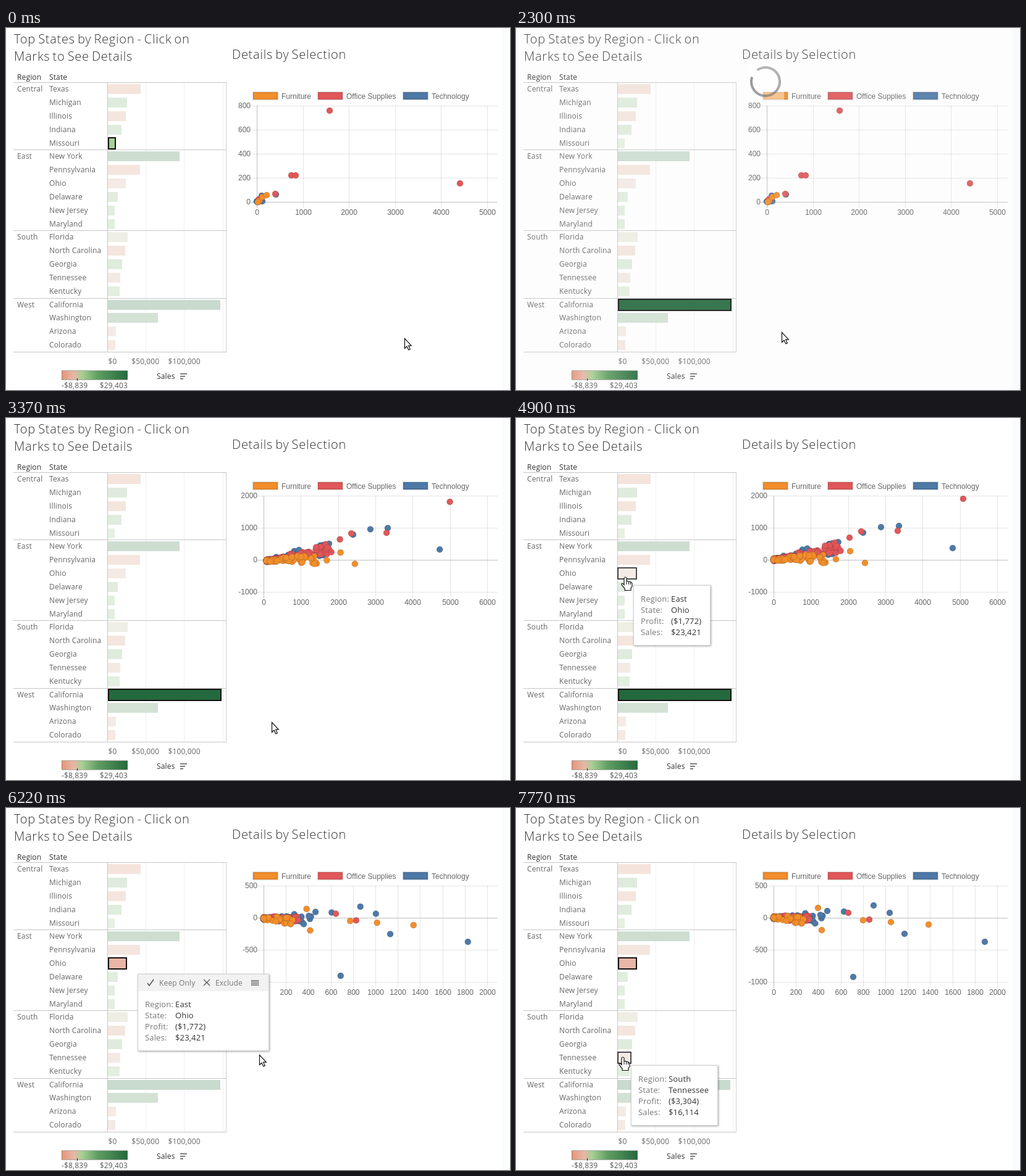
These frames come from a looping animation (816x587 px, 8000 ms). An HTML page with a canvas:

```html
<!DOCTYPE html>
<html lang="en">
<head>
<meta charset="utf-8">
<title>Top States by Region</title>
<style>
html, body { margin: 0; width: 100%; height: 100%; overflow: hidden; background: #fafbfb; }
canvas { display: block; }
</style>
</head>
<body>
<canvas id="stage" width="816" height="587"></canvas>
<script>
const ctx = document.getElementById('stage').getContext('2d');
const SANS = '"Open Sans", "Noto Sans", sans-serif';
const ARIAL = '"Liberation Sans", Arial, sans-serif';
const ORANGE = '#f28e2b', RED = '#e15759', BLUE = '#4e79a7';
const LOOP = 8000, BEAT = 259; // the picture refreshes once per beat

// state: sales, profit
const regions = {
  Central: { Texas: [42800, -8839], Michigan: [25200, 7000], Illinois: [23600, -7000], Indiana: [18000, 6500], Missouri: [9200, 3000] },
  East: { 'New York': [93200, 24000], Pennsylvania: [42000, -7000], Ohio: [23421, -1772], Delaware: [13200, 6000],
    'New Jersey': [9200, 5500], Maryland: [9200, 5500] },
  South: { Florida: [26000, 500], 'North Carolina': [22800, -7000], Georgia: [18800, 7000], Tennessee: [16114, -3304], Kentucky: [15535, 4752] },
  West: { California: [146388, 29403], Washington: [65200, 17000], Arizona: [10800, -1500], Colorado: [10000, -4000] }
};
const rows = Object.entries(regions).flatMap(([region, states]) =>
  Object.entries(states).map(([name, [sales, profit]], i) =>
    ({ region, name, sales, profit, first: i === 0, right: Math.round(164.5 + sales / 800) })));
rows.forEach((row, i) => { row.y = 99.2 + 21.84 * i; });
const find = name => rows.find(row => row.name === name);

// profit colour scale
const MIN = -8839, MAX = 29403;
const scale = [[MIN, [228, 150, 120]], [-1772, [232, 182, 166]], [3000, [166, 208, 148]], [12000, [96, 158, 98]], [MAX, [36, 105, 61]]];
const mix = (a, b, u) => a.map((v, i) => v + (b[i] - v) * u);
const rgb = c => `rgb(${c.map(Math.round)})`;

function profitColor(profit) {
  const i = Math.max(1, scale.findIndex(([limit]) => profit <= limit));
  const [[p0, c0], [p1, c1]] = [scale[i - 1], scale[i]];
  return mix(c0, c1, (profit - p0) / (p1 - p0));
}
const fadedColor = profit => mix([248, 250, 248], profitColor(profit), .22);

let seed = 7;
const rnd = () => (seed = seed * 16807 % 2147483647) / 2147483647;

// points that spread from the origin, each with a margin between low and high
function fan(count, reach, low, high) {
  return ([x, y]) => Array.from({ length: count }, () => {
    const dx = reach * rnd() ** 2;
    return [x + dx, y - dx * (low + (high - low) * rnd()) + 4 * rnd() - 2];
  });
}

// layers go from back to front: colour, crowd, outliers in stage pixels
const charts = [
  {
    left: 406, step: 74.5, xTick: 1000, yTicks: [800, 600, 400, 200, 0],
    layers: [
      [BLUE, fan(5, 12, 0, .9), [[437, 270], [414, 272], [415, 281]]],
      [RED, fan(4, 6, .3, .9), [[524, 134], [462, 239], [469, 239], [735, 252], [436, 269]]],
      [ORANGE, fan(2, 12, .6, .9), [[415, 274], [422, 271]]]
    ]
  },
  {
    left: 417, step: 60.3, xTick: 1000, yTicks: [2000, 1000, 0, -1000], pivot: [560, 282],
    layers: [
      [BLUE, fan(45, 115, .08, .33), [[707, 211], [591, 177], [620, 175], [562, 186]]],
      [RED, fan(90, 110, .12, .27), [[724, 131], [618, 183], [559, 184], [540, 194]]],
      [ORANGE, fan(70, 85, -.08, .16), [[565, 235], [541, 216], [518, 229], [497, 235]]]
    ]
  },
  {
    left: 417, step: 36.2, xTick: 200, yTicks: [500, 0, -500, -1000], pivot: [417, 216],
    layers: [
      [BLUE, fan(45, 80, -.14, .16), [[759, 217], [546, 274], [629, 204], [605, 170], [579, 158], [504, 167], [531, 168]]],
      [RED, fan(55, 60, -.12, .1), [[572, 181], [538, 170]]],
      [ORANGE, fan(32, 50, -.25, .1), [[668, 189], [607, 185], [562, 182], [495, 198], [489, 162]]]
    ]
  }
];
for (const chart of charts) {
  const { left, yTicks, layers } = chart;
  const origin = [left, 126 + 156 * yTicks.indexOf(0) / (yTicks.length - 1)];
  chart.pivot ??= origin;
  chart.layers = layers.map(([color, crowd, outliers]) => [color, [...crowd(origin), ...outliers]]);
}

// pointer path: beat, x, y
const path = [
  [0, 645, 503], [2, 144, 400], [3, 178, 432], [4, 184, 437], [5, 190, 448], [7, 430, 493], [14, 430, 493], [18, 110, 262],
  [19, 177, 258], [20, 194, 256], [22, 194, 256], [24, 410, 400], [26, 410, 400], [29, 110, 410], [30, 173, 404]
];

function pointerAt(beat) {
  const i = Math.max(1, path.findIndex(([b]) => beat <= b));
  const [b0, ...from] = path[i - 1], [b1, ...to] = path[i];
  return mix(from, to, (beat - b0) / (b1 - b0)).map(Math.round);
}

const rowUnder = ([x, y]) => rows.find(row => x > 164 && x <= row.right + 2 && Math.abs(y - row.y) < 10.9);

function text(str, x, y, color, size = 12, { align = 'left', weight = 400, family = SANS, gap = .15, word = 0 } = {}) {
  ctx.font = `${weight} ${size}px ${family}`;
  ctx.letterSpacing = gap + 'px';
  ctx.wordSpacing = word + 'px';
  ctx.textAlign = align;
  ctx.fillStyle = color;
  ctx.fillText(str, x, y);
}
const title = (str, x, y) => text(str, x, y, '#333', 20, { weight: 300, gap: .76, word: -1.8 });
const label = (str, x, y, align) => text(str, x, y, '#666', 12, { align, family: ARIAL, gap: 0 });

function rect(x, y, w, h, color) {
  ctx.fillStyle = color;
  ctx.fillRect(x, y, w, h);
}

function frame(x, y, w, h, color, width = 1) {
  ctx.strokeStyle = color;
  ctx.lineWidth = width;
  ctx.strokeRect(x, y, w, h);
}

function line(color, width, ...points) {
  ctx.strokeStyle = color;
  ctx.lineWidth = width;
  ctx.beginPath();
  for (const [x, y] of points) ctx.lineTo(x, y);
  ctx.stroke();
}

function drawBars(selected, hovered) {
  title('Top States by Region - Click on', 13, 25);
  title('Marks to See Details', 13, 53);
  text('Region', 18, 84, '#333');
  text('State', 70, 84, '#333');
  ['$0', '$50,000', '$100,000'].forEach((amount, i) => {
    rect(226 + 62.5 * i | 0, 89, 1, 436, '#f0f0f0');
    text(amount, i ? 163 + 62.8 * i : 172.5, 545, '#666', 12, { align: 'center' });
  });
  rect(164, 88, 1, 437, '#c6c6c6');
  rect(356, 88, 1, 437, '#d0d0d0');
  rect(12, 525, 345, 1, '#c6c6c6');

  for (const row of rows) {
    const { region, name, y, right, profit, first } = row;
    const top = Math.round(y - 8);
    if (first) {
      rect(12, Math.round(y - 11), 345, 1, '#c6c6c6');
      text(region, 18, y + 4, '#666');
    }
    text(name, 70, y + 4, '#666');
    rect(165, top, right - 165, 16, rgb(fadedColor(profit)));
    if (row === selected) {
      rect(165, top - 1, right - 164, 18, rgb(profitColor(profit)));
      frame(166, top - 1, right - 165, 18, '#111', 2);
    } else if (row === hovered) {
      frame(165, top - 1, right - 164, 18, '#111', 1.5);
    }
  }

  text('Sales', 244, 569, '#333');
  [11, 8, 5].forEach((w, i) => rect(282, 560 + 4 * i, w, 1.5, '#555'));
}

function drawScale() {
  const fill = ctx.createLinearGradient(90, 0, 197, 0);
  for (const [profit, color] of scale) fill.addColorStop((profit - MIN) / (MAX - MIN), rgb(color));
  rect(90, 556, 107, 14, fill);
  frame(90.5, 555.5, 106, 15, 'rgba(110,110,100,.6)');
  rect(115, 568, 1, 4, '#222');
  text('-$8,839', 90, 584, '#555');
  text('$29,403', 197, 584, '#555', 12, { align: 'right' });
}

function drawChart({ left, step, xTick, yTicks, pivot, layers }, progress) {
  title('Details by Selection', 366, 50);
  [[400, ORANGE, 'Furniture'], [505, RED, 'Office Supplies'], [643, BLUE, 'Technology']].forEach(([x, color, name]) => {
    rect(x, 104, 40, 12, color);
    frame(x, 104, 40, 12, 'rgba(0,0,0,.1)', 3);
    label(name, x + 46, 115);
  });

  const tint = value => `rgba(0,0,0,${value ? .1 : .25})`;
  yTicks.forEach((value, i) => {
    const y = 126 + 156 / (yTicks.length - 1) * i;
    rect(left - 10, y, 806 - left, 1, tint(value));
    label(value, left - 10, y + 4, 'right');
  });
  for (let i = 0; left + i * step < 796; i++) {
    const x = Math.round(left + i * step);
    rect(x, 126, 1, 166, tint(i));
    label(i * xTick, x + .5, 303, 'center');
  }

  ctx.strokeStyle = 'rgba(0,0,0,.15)';
  ctx.lineWidth = 1;
  for (const [color, points] of layers) {
    ctx.fillStyle = color;
    for (const point of points) {
      ctx.beginPath();
      ctx.arc(...mix(pivot, point, progress), 5, 0, 7);
      ctx.fill();
      ctx.stroke();
    }
  }
}

function drawLoading(turn) {
  rect(0, 0, 816, 587, 'rgba(235,235,235,.1)');
  rect(374, 57, 60, 60, 'rgba(255,255,255,.42)');
  ctx.lineWidth = 4;
  for (let i = 0; i < 48; i++) {
    const a = turn - 2.2 + i * .118;
    ctx.strokeStyle = `rgba(112,112,118,${.5 + .25 * i / 48})`;
    ctx.beginPath();
    ctx.arc(404, 87, 23, a, a + .119);
    ctx.stroke();
  }
}

function money(value) {
  const amount = '$' + Math.abs(value).toLocaleString('en-US');
  return value < 0 ? `(${amount})` : amount;
}

function drawTooltip(row, [px, py], toolbar) {
  const lines = Object.entries({ Region: row.region, State: row.name, Profit: money(row.profit), Sales: money(row.sales) });
  ctx.font = `400 13px ${SANS}`;
  ctx.letterSpacing = '.15px';
  const fit = Math.max(...lines.map(([, value]) => ctx.measureText(value).width)) + 76;
  const w = toolbar ? 213 : Math.round(fit), head = toolbar ? 27 : 0, h = 98 + head;
  const x = px + 13, y = py + 13;
  ctx.save();
  ctx.shadowColor = 'rgba(0,0,0,.35)';
  ctx.shadowBlur = 3;
  ctx.shadowOffsetX = ctx.shadowOffsetY = 1;
  rect(x, y, w, h, '#fff');
  ctx.restore();
  frame(x + .5, y + .5, w - 1, h - 1, '#d2d2d2');
  if (toolbar) {
    rect(x + 1, y + 1, w - 2, head, '#f2f2f2');
    line('#555', 1.6, [x + 16, y + 15], [x + 19, y + 19], [x + 26, y + 9]);
    text('Keep Only', x + 35, y + 19, '#777');
    line('#555', 1.3, [x + 107, y + 9], [x + 117, y + 19]);
    line('#555', 1.3, [x + 117, y + 9], [x + 107, y + 19]);
    text('Exclude', x + 126, y + 19, '#777');
    for (let i = 0; i < 16; i++) rect(x + 184 + i % 4 * 3.2, y + 10 + (i >> 2) * 2.5, 2.6, 1.4, '#555');
  }
  lines.forEach(([name, value], i) => {
    const base = y + head + 27 + 18 * i;
    text(name + ':', x + 12, base, '#777', 13);
    text(value, x + 61, base, '#333', 13);
  });
}

const arrow = new Path2D('M.5 .5V16.5L4 13.2L6.8 19L9.3 18L6.7 12.2H11.3Z');
const hand = new Path2D('M-2 1.5Q0-1.5 2 1.5V7Q4 5.5 5.5 7.5Q7.5 6.5 8.5 8.5Q11 8 11 11V15L9 18V21.5H-1V18.5L-6 12.5Q-6.5 9.5-4 10.5L-2 12.5Z');

function drawPointer([x, y], shape) {
  ctx.save();
  ctx.translate(x, y);
  ctx.fillStyle = '#fff';
  ctx.strokeStyle = '#111';
  ctx.lineWidth = 1.2;
  ctx.fill(shape);
  ctx.stroke(shape);
  if (shape === hand) for (const k of [2, 5.5, 8.5]) line('#111', 1, [k, 8], [k, 12]);
  ctx.restore();
}

// eased entry of the points over roughly four beats
const entry = beats => 1 - (1 - Math.min(1, .31 + .265 * beats)) ** 4;

function draw(t) {
  const beat = Math.min(30, Math.floor((t + 50) / BEAT));
  const pointer = pointerAt(beat);
  const hovered = rowUnder(pointer);
  const selected = find(beat < 6 ? 'Missouri' : beat < 20 ? 'California' : 'Ohio');
  const loading = beat >= 9 && beat < 12 || beat === 22;
  const pinned = beat >= 20 && beat < 27;

  rect(0, 0, 816, 587, '#fafbfb');
  rect(4, 0, 800, 587, '#fff');
  drawBars(selected, hovered);
  drawScale();
  if (beat < 12) drawChart(charts[0], 1);
  else if (beat < 23) drawChart(charts[1], entry(beat - 12));
  else drawChart(charts[2], entry(beat - 23));
  if (loading) drawLoading((beat - 9) * 1.6);
  if (pinned) drawTooltip(selected, [200, 256], true);
  else if (hovered) drawTooltip(hovered, pointer);
  drawPointer(pointer, hovered ? hand : arrow);
}

function tick() {
  draw(performance.now() % LOOP);
  requestAnimationFrame(tick);
}
tick();
</script>
</body>
</html>
```
